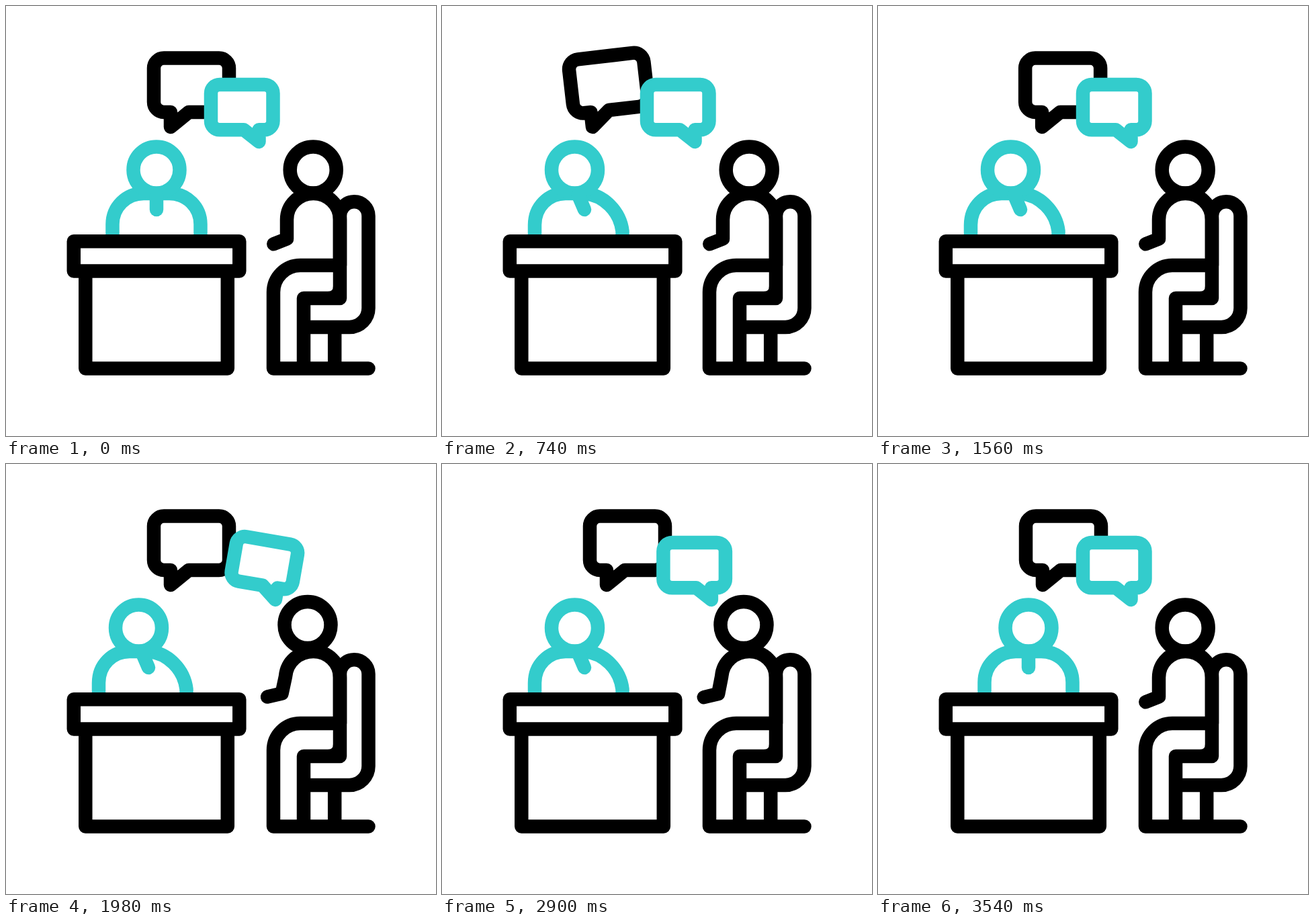
Recreate the animation shown at these times as an HTML page. Size 640 px wide and 640 px high, loop 3.6 s.

```html
<!DOCTYPE html>
<html lang="en">
<head>
<meta charset="utf-8">
<title>Interview</title>
<style>
  html, body { margin: 0; height: 100%; overflow: hidden; background: #fff; }
  svg { display: block; width: 100vw; height: 100vh; }
  g { fill: none; stroke: #000; stroke-width: 20.5; stroke-linecap: round; stroke-linejoin: round; }
  .teal { stroke: #33cccc; }
  .solid { fill: #fff; }
</style>
</head>
<body>
<svg viewBox="0 0 640 640">
  <g id="askBubble" class="solid">
    <path d="M245 158H235a15 15 0 0 1-15-15V92.500a15 15 0 0 1 15-15H317a15 15 0 0 1 15 15V143a15 15 0 0 1-15 15H272L245 180Z"/>
  </g>
  <g id="replyBubble" class="teal solid">
    <path d="M376.500 184.300H384.500a13 13 0 0 0 13-13V130a13 13 0 0 0-13-13H318a13 13 0 0 0-13 13V171.300a13 13 0 0 0 13 13H354L376.500 202Z"/>
  </g>

  <g class="teal">
    <path id="hostBody"/>
    <circle id="hostHead" class="solid" cy="244" r="34.5"/>
    <path id="tie"/>
  </g>

  <g class="solid">
    <path d="M118.300 394V539.500H329.800V394"/>
    <path d="M100.800 350.300H347.300V394.500H100.800Z"/>
  </g>

  <g>
    <path d="M497 386H438a40 40 0 0 0-40 40V539.500H539.500M443 539.500V435H497V312.500a21.200 21.200 0 0 1 42.500 0V449a28.500 28.500 0 0 1-28.500 29H443M489.200 478V539"/>
    <path d="M487 417v8h-8q8 0 8-8" fill="#000" stroke="none"/>
    <path id="guestBody"/>
    <circle id="guestHead" r="34.5"/>
  </g>
</svg>
<script>
const LOOP = 3600, SWING = 10.3;
const $ = id => document.getElementById(id);
const set = (id, attrs) => {
  for (const name in attrs) $(id).setAttribute(name, attrs[name]);
};

const hostRest = 'M158.5 350L158.5 325C158.5 299 179 279 205 279L243 279C269 279 289.5 299 289.5 325L289.5 350';
const hostLean = 'M138 350L138 326C138 299 158 279 184 279L212 279C241 281 265 306 268.5 335L268.5 350';
const tieRest = 'M224 282L224 303';
const tieLean = 'M203 282L212 303';
const guestRest = 'M497 386L497 318C497 296 479 279 457.5 279C436 279 418 296 418 318L418 346.500L398.300 354.300'
  + 'A20.5 20.5 0 0 0 414.500 391.800L436 383.500C446 380 457 368 457 352L457 323.500';
const guestReach = 'M497 386L497 318C497 296 479 279 457.5 279C436 279 418 294 416 316L410.500 341.500L389 346.500'
  + 'A20.5 20.5 0 0 0 400.600 385.500L423 381C434 378.500 446 368 447.500 352L451 323.500';

const lerp = (a, b, k) => a + (b - a) * k;
const ease = x => (1 - Math.cos(Math.PI * Math.min(1, Math.max(0, x)))) / 2;
const between = (t, start, end) => ease((t - start) / (end - start));
const wave = (t, period) => 2 * Math.PI * t / period;

// Blend two paths that share the same commands.
function blend(from, to, k) {
  const ends = to.match(/[\d.]+/g);
  let i = 0;
  return from.replace(/[\d.]+/g, v => lerp(+v, +ends[i++], k).toFixed(2));
}

// Two and a half swings about the tip of the bubble's tail.
const rock = t => t > 0 && t < 1000 ? SWING * Math.sin(wave(t, 400)) : 0;

function reach(t) {
  if (t < 0 || t > 1475) return 0;
  return 1.04 * (t < 350 ? ease(t / 350) : (1 + Math.cos(wave(t - 350, 450))) / 2);
}

function draw(t) {
  const askShift = between(t, 0, 300) - between(t, 1300, 1600);
  const replyShift = between(t, 1610, 1900) - between(t, 2960, 3280);
  const lean = between(t, 0, 300) - between(t, 3080, 3400);
  const nod = between(t, 1620, 1920) - between(t, 3200, 3500);

  set('askBubble', { transform: `translate(${-21 * askShift}) rotate(${-rock(t - 297)} 245 180)` });
  set('replyBubble', { transform: `translate(${24.4 * replyShift}) rotate(${rock(t - 1900)} 376.5 202)` });
  set('hostBody', { d: blend(hostRest, hostLean, lean) });
  set('tie', { d: blend(tieRest, tieLean, lean) });
  set('hostHead', { cx: lerp(224, 197.5, lean) });
  set('guestBody', { d: blend(guestRest, guestReach, reach(t - 1600)) });
  set('guestHead', { cx: lerp(457.2, 449, nod), cy: lerp(244, 239.5, nod) });
}

function frame() {
  draw(performance.now() % LOOP);
  requestAnimationFrame(frame);
}
frame();
</script>
</body>
</html>
```
